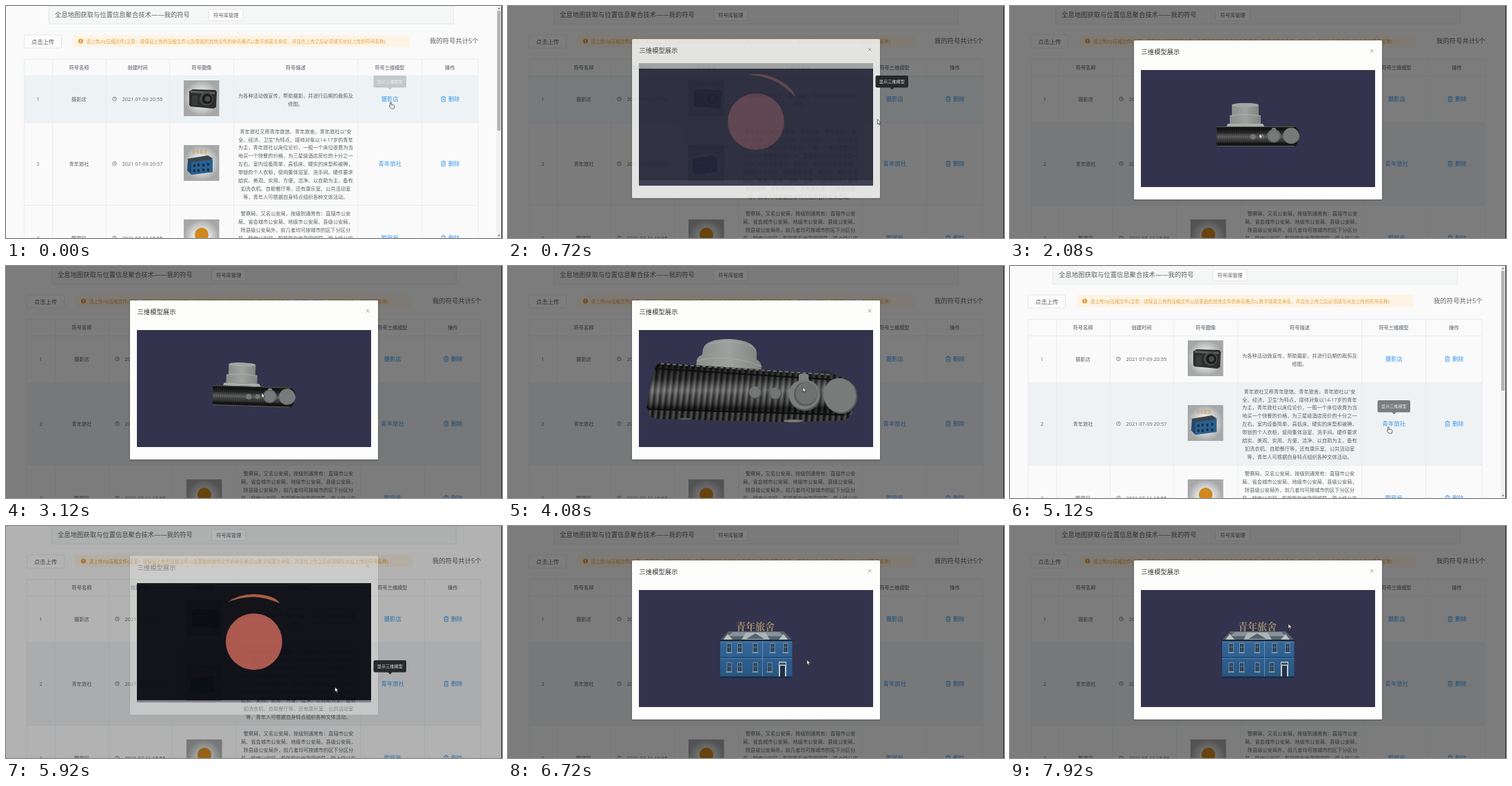
Recreate the animation shown at these times as an HTML page. Size 720 px wide and 337 px high, loop 8000 ms.

```html
<!DOCTYPE html>
<html lang="zh">
<head>
<meta charset="utf-8">
<title>我的符号</title>
<style>
html, body { margin: 0; width: 100%; height: 100%; overflow: hidden; background: #f9fafa; }
svg { display: block; width: 100%; height: 100%; }
text { font-family: "Open Sans", "Noto Sans CJK SC", "Noto Sans CJK", sans-serif; }
.sign { font-family: "Noto Serif CJK SC", "Noto Sans CJK SC", serif; font-weight: 600; }
</style>
</head>
<body>
<svg id="stage" viewBox="0 0 720 337" preserveAspectRatio="none"></svg>
<script>
const GREY = '#606266', BLUE = '#3f98ee', LINE = '#e9ecf0';

// ---- drawing helpers ----
const rect = (x, y, w, h, fill, more = '') =>
  `<rect x="${x}" y="${y}" width="${w}" height="${h}" fill="${fill}" ${more}/>`;
const circle = (x, y, r, fill, more = '') => `<circle cx="${x}" cy="${y}" r="${r}" fill="${fill}" ${more}/>`;
const oval = (x, y, rx, ry, fill, more = '') =>
  `<ellipse cx="${x}" cy="${y}" rx="${rx}" ry="${ry}" fill="${fill}" ${more}/>`;
const path = (d, fill, more = '') => `<path d="${d}" fill="${fill}" ${more}/>`;
const stroke = (d, color, w = 1) => path(d, 'none', `stroke="${color}" stroke-width="${w}"`);
const text = (x, y, size, fill, s, anchor = 'middle', more = '') =>
  `<text x="${x}" y="${y + size * 0.37}" font-size="${size}" fill="${fill}" text-anchor="${anchor}" ${more}>${s}</text>`;
const group = (id, body, more = '') => `<g id="${id}" ${more}>${body}</g>`;
const gradient = (id, stops, dir = 'x2="0" y2="1"') => `<linearGradient id="${id}" ${dir}>` +
  stops.map(([o, c, a = 1]) => `<stop offset="${o}" stop-color="${c}" stop-opacity="${a}"/>`).join('') + '</linearGradient>';
const ridges = (id, w, dark, light) => gradient(id + 'Tone', [[0, dark], [.6, light], [1, dark]], '') +
  `<pattern id="${id}" width="${w}" height="400" patternUnits="userSpaceOnUse" patternTransform="skewX(-6)">` +
  rect(0, 0, w, 400, `url(#${id}Tone)`) + '</pattern>';

const defs = `<defs>
  <radialGradient id="photo"><stop offset=".3" stop-color="#f2f2f2"/><stop offset="1" stop-color="#a6a7a7"/></radialGradient>
  ${ridges('fine', 3, '#191a1a', '#4b4d4c')}${ridges('coarse', 8.6, '#0d0e0e', '#767876')}
  ${gradient('sheen', [[0, '#000', .75], [.3, '#111', .45], [.52, '#aaa', .36], [.66, '#555', .25], [.85, '#000', .65], [1, '#000', .5]])}
  ${gradient('metal', [[0, '#8b8e8b'], [.5, '#9ea19e'], [1, '#828582']], '')}
  ${gradient('wall', [[0, '#35679a'], [.5, '#2d5e8f'], [1, '#2a557f']])}
  <clipPath id="view"><rect x="190" y="93" width="340" height="170"/></clipPath>
  <filter id="shade" x="-10%" y="-10%" width="120%" height="120%"><feDropShadow dx="0" dy="1" stdDeviation="1.5" flood-opacity=".25"/></filter>
</defs>`;

// ---- page ----
const cols = [26.5, 67.5, 145.5, 237.5, 330.5, 510.5, 603.5, 685.5];
const tops = [77.5, 101.5, 169.5, 289.5];
const rows = [
  { y: 135, name: '摄影店', time: '2021 07-09 20:55', first: 130, lines: [
    '为各种活动做宣传，帮助摄影，并进行后期的裁剪及', '修图。'] },
  { y: 229, name: '青年旅社', time: '2021 07-09 20:57', first: 182, lines: [
    '青年旅社又称青年旅馆、青年旅舍。青年旅社以“安',
    '全、经济、卫生”为特点，接待对象以14-17岁的青年',
    '为主，青年旅社以床位论价，一般一个床位收费为当',
    '地买一个快餐的价格，为三星级酒店房价的十分之一',
    '左右。室内设备简单，高低床、硬实的床垫和被褥，',
    '带锁的个人衣柜，使用集体浴室、洗手间。硬件要求',
    '结实、美观、实用、方便、洁净、以自助为主，备有',
    '如洗衣机、自助餐厅等，还有康乐室、公共活动室',
    '等，青年人可根据自身特点组织各种文体活动。'] },
  { y: 337, name: '警察局', time: '2021 07-11 15:55', first: 301.5, lines: [
    '警察局，又名公安局，按级别通常有：直辖市公安',
    '局、省会城市公安局、地级市公安局、县级公安局，',
    '除县级公安局外，前几者均可按城市的区下分区分',
    '局，特定公安局、股所所在地政府领导，受上级公安'] }
];

const thumbs = [
  path('M266 124l5-3 33 1 2 3-1 22-4 2-33-3-2-2z', '#2c2d2d') + path('M268 123l35 2v3l-35-2z', '#5d5f5f') +
    circle(291, 135, 10, '#484a4a') + circle(292, 135, 7.5, '#1b1c1c') + circle(292.5, 135, 4, '#4a4d50') +
    rect(270, 130, 8, 14, '#3b3c3c'),
  path('M264 223l31-3 5 4v17l-31 4-6-6z', '#1f4a72') + path('M269 226l31-3v18l-31 4z', '#2b618f') +
    path('M263 222l30-5 8 5-32 5z', '#3a4650') +
    path('M272 230h3v4h-3zm6-1h3v4h-3zm7 0h3v4h-3zm7-1h3v4h-3zm-20 9h3v4h-3zm6 0h3v4h-3zm7-1h3v4h-3zm7 0h3v4h-3z', '#16304a') +
    text(281, 211.5, 5.5, '#c49a4a', '青年旅舍', 'middle', 'class="sign"'),
  circle(284, 332, 10, '#d0881f')
];

const clock = y => circle(157.5, y, 2.8, 'none', `stroke="${GREY}" stroke-width=".7"`) + stroke(`M157.5 ${y - 1.8}v1.9h1.4`, GREY, .6);
const bin = y => stroke(`M631.5 ${y - 2.4}h7M633.8 ${y - 2.6}v-1.2h2.4v1.2M632.4 ${y - 2.2}v6h5.2v-6M634.2 ${y - .6}v3M635.8 ${y - .6}v3`, BLUE, .75);

function row({ y, name, time, first, lines }, i) {
  return text(46.5, y, 7.3, GREY, i + 1) + text(106, y, 7.25, GREY, name) +
    clock(y) + text(168.5, y, 7.4, GREY, time, 'start') +
    rect(258, y - 27, 51.5, 52, 'url(#photo)') + thumbs[i] +
    lines.map((s, k) => text(420.5, first + k * 11.9, 7.25, GREY, s)).join('') +
    text(557.3, y, 8.35, BLUE, name) + bin(y) + text(642, y, 8.35, BLUE, '删除', 'start');
}

const heads = [[106, '符号名称'], [191, '创建时间'], [284, '符号图像'], [420.5, '符号描述'], [557, '符号三维模型'], [644.5, '操作']];
const page =
  rect(62.5, -4, 587, 30, '#f5f6f6', 'stroke="#e6e7e8"') +
  text(71, 13, 9.33, GREY, '全息地图获取与位置信息聚合技术——我的符号', 'start') +
  rect(294.5, 5, 49.5, 16.5, '#fdfdfd', 'rx="2" stroke="#dcdfe3" stroke-width=".8"') + text(319.5, 13.2, 7.25, GREY, '符号库管理') +
  rect(26.5, 42, 54, 19, '#fcfcfc', 'rx="2" stroke="#e0e3e6" stroke-width=".8"') + text(53.5, 51.5, 8.35, GREY, '点击上传') +
  rect(96.5, 42, 489.5, 18, '#fdf4e6', 'rx="3"') +
  circle(108.5, 51, 3.6, '#e6a03a') + rect(108.1, 48.8, .9, 2.7, '#fff') + rect(108.1, 52.2, .9, .9, '#fff') +
  text(116.5, 51.3, 6.7, '#e6a03a', '请上传zip压缩文件(注意：请保证上传的压缩文件以及里面的其他文件的命名格式以数字或英文命名，并且在上传之后必须填写对应上传的符号名称)', 'start') +
  text(686, 51, 9.4, GREY, '我的符号共计5个', 'end') +
  rect(26.5, 101.5, 659, 68, '#edf3f5', 'id="hover1"') + rect(26.5, 169.5, 659, 120, '#eff2f3', 'id="hover2"') +
  stroke(cols.map(x => `M${x} 77.5V337`).join('') + tops.map(y => `M26.5 ${y}H685.5`).join(''), LINE, .9) +
  heads.map(([x, s]) => text(x, 89.5, 7.2, '#85888e', s, 'middle', 'font-weight="600"')).join('') +
  rows.map(row).join('');

const bar = rect(712, 0, 7, 337, '#f1f1f1') + rect(713, 7, 5, 174, '#b4b5b5') +
  path('M713.8 4.5h3.6l-1.8-2.4z', '#777') + path('M713.8 332.5h3.6l-1.8 2.4z', '#777');

// ---- models ----
const small =
  path('M322 144q0-3 19.500-3t19.500 3v15h-39z', 'url(#metal)') + oval(341.5, 144, 19.5, 3, '#a4a6a3') +
  path('M319 159q22-4 45 0v12h-45z', 'url(#metal)') + stroke('M319 159.500q22-4 45 0', '#b4b6b3', .8) +
  path('M316 171h51l3 5h-56z', '#abaeaa') +
  path('M395 176q3-5 9-5t10 5z', '#333535') +
  ['url(#fine)', 'url(#sheen)'].map(f => path('M300 175h112q9 3 9 12t-7 17h-114z', f)).join('') +
  stroke('M300 175.500h113M300 203.500h113', '#6d706e', .8) + stroke('M300 179.500h112', '#111', 1) +
  circle(352.5, 190, 4, '#747774') + circle(365, 189.5, 3.5, '#747774') +
  rect(380, 177, 6, 5, '#858885', 'rx="1.5"') + circle(383, 188.5, 9.8, '#6c6f6d') + circle(383, 188.5, 7.5, '#777a78') +
  circle(408, 188.5, 11.8, '#777a78');

const back = rect(300, 0, 121, 70, '#202222', 'rx="4"') + rect(308, 10, 74, 50, '#34383c') +
  circle(402, 37, 9, '#4c4f4e') + circle(402, 37, 4, '#2b2d2d');

const bodyTop = 'M211 154Q214 141 224 141L470 157Q505 164 507 187Q506 214 486 218L206 209L201 206Z';
const bodyRim = 'M203 206L486 214Q498 211 502 207Q499 221 486 224L410 227L215 222Q203 219 203 206Z';
const large =
  path('M283 121Q286 106 322 106Q358 108 361 125L361 148L280 140Z', 'url(#metal)') +
  stroke('M284 119Q290 110 322 110Q356 112 360 124', '#a9aba8', .8) +
  path('M274 137Q276 124 318 126Q366 130 368 145L367 158L273 149Z', 'url(#metal)') + stroke('M274 138Q318 126 368 146', '#a9aca8', .8) +
  path('M450 158l6-6q10-1 22 9z', '#292b2b') +
  path(bodyRim, 'url(#coarse)') + path(bodyRim, '#000', 'opacity=".3"') +
  path(bodyTop, 'url(#coarse)') + path(bodyTop, 'url(#sheen)') +
  stroke('M213 149L470 165', '#0d0e0e', 2) + path('M222 142L470 158', 'none', 'stroke="#6d706e" stroke-width="2" stroke-dasharray="5 3.6"') +
  stroke('M203 208L486 216', '#0d0e0e', 2) +
  oval(257, 222, 8, 1.6, '#565957') + oval(414, 225, 14, 2, '#767a72') +
  circle(359, 184, 9.3, '#4d504e') + circle(358.5, 183.3, 8.3, '#737674') +
  circle(388.5, 185.5, 9, '#4d504e') + circle(388, 184.8, 8, '#737674') +
  path('M422 158q7-4 14 0l1 14h-15z', '#7f827f') +
  oval(431, 188, 23, 22.5, '#555856') + oval(430, 186.5, 22.5, 21.5, '#7a7d7a') +
  oval(432, 186, 17, 17.5, '#575a58') + oval(433, 185, 15.5, 16, '#6e716f') +
  oval(483, 189, 24, 26, '#555856', 'transform="rotate(-18 483 189)"') + oval(481.5, 188, 23.5, 25, '#787b79', 'transform="rotate(-18 481 188)"');

const pane = (x, y) => rect(x - 3.5, y, 7, 14, '#7f97aa') + rect(x - 2.5, y + 1, 5, 12, '#1c3046') +
  stroke(`M${x} ${y + 1}v12M${x - 2.5} ${y + 6}h5`, '#8fa3b2', .6) + rect(x - 4.5, y + 13.5, 9, 1.2, '#93a6b4');
const house =
  path('M320 153h80l13 13h-105z', '#59646c') + path('M326 154h68l6 6h-80z', '#87919a') +
  path('M339 165l6-10h29l6 10z', '#adb4b6') + path('M346 164l13-8 13 8z', '#57636e') +
  path('M313 165l6-8 7 8zM393 165l7-8 6 8z', '#bcc1c0') +
  rect(308, 165, 104.5, 56, 'url(#wall)') + rect(307, 165, 106.5, 2.5, '#1b2d3f') + rect(308, 168, 104.5, 1, '#5a86ae') +
  rect(308, 190.5, 104.5, 1.2, '#1d4166') + rect(308, 192, 104.5, 1, '#4f7fab') +
  [321, 336.5, 359, 384, 403].map(x => pane(x, 170)).join('') +
  [321, 336.5, 359, 380].map(x => pane(x, 198)).join('') +
  stroke('M369.500 167v53', '#6f99bd', .8) +
  rect(393, 197, 11, 23, '#c7cdce') + rect(395, 203, 7, 17, '#203247') + rect(394, 198.5, 9, 3, '#394d5e') +
  rect(308, 218.5, 104.5, 2.5, '#182d42') +
  text(359, 145.5, 14, '#a8956f', '青年旅舍', 'middle', 'class="sign"');

// ---- dialog, loader, tooltip, pointer ----
const dialog = rect(180, 50, 360, 231, '#fdfefb', 'rx="1.5" filter="url(#shade)"') +
  text(190.5, 67, 9.33, '#303133', '三维模型展示', 'start') +
  stroke('M522.800 62.800l4.600 4.600m0-4.600l-4.600 4.600', '#85888d', .8) +
  rect(190, 93, 340, 170, '#33334d') +
  `<g clip-path="url(#view)">${group('camera', group('back', back) + group('small', small))}${group('large', large)}${group('house', house)}</g>`;

const loader = rect(190, 83, 340, 170, '#0a0c12') + circle(360, 168, 41, '#b0584c') +
  group('spin', path('M321 111Q338 99 360 99Q390 100 397 112Q376 103 358 103Q338 104 321 111Z', '#ad5a40'));

const tip = rect(533.5, 101, 47.5, 17.5, '#26282a', 'rx="2"') + path('M554 118h7l-3.500 3.500z', '#26282a') +
  text(557.3, 109.8, 6.2, '#e6e6e6', '显示三维模型');

const ink = 'stroke="#222" stroke-width=".7" stroke-linejoin="round"';
const arrow = path('M0 0v7l1.600-1.400 1.100 2.500 1.200-.5-1.100-2.500h2.200z', '#fff', ink);
const hand = path('M-.8 1q.8-1.200 1.600 0v3.200l3.500.8q1.200.4 1 1.700l-.6 3.300h-4.200l-2.700-3.600q-.2-1.200 1.400-.4z', '#fff', ink);

document.getElementById('stage').innerHTML = defs + rect(0, 0, 720, 337, '#f9faf9') +
  group('page', page) + group('bar', bar) + rect(0, 0, 720, 337, '#000', 'id="mask"') +
  group('dialog', dialog) + group('loader', loader) + group('tip', tip) +
  group('arrow', arrow) + group('hand', hand) + rect(719, 0, 1, 337, '#2a2a2a');

// ---- timeline: rows of [ms, value...] ----
const LOOP = 8000, OPEN = [500, 5820], CLOSE = 4700;
const tracks = {
  pointer: [[0, 558.5, 139], [400, 557, 138], [520, 556, 141], [720, 536.5, 164.5], [960, 500, 183], [1200, 430, 188],
    [1440, 372, 150], [1920, 362, 176], [2080, 362, 185.5], [2400, 357, 187], [2960, 368, 185], [3600, 380, 183],
    [3840, 400, 180], [4080, 428, 176], [4360, 429, 176], [4560, 500, 90], [4640, 525, 65], [4760, 525, 65],
    [5040, 549, 224], [5120, 549.5, 233], [5780, 549.5, 233], [5920, 477.5, 234], [6400, 450, 220], [7000, 420, 172],
    [7520, 406, 147], [7920, 404, 142]],
  tip: [[0, .2], [160, 1], [760, 1], [1000, 0], [5050, 0], [5172, 1], [5960, 1], [6200, 0]],
  hover1: [[0, 1], [640, 1], [860, 0]],
  hover2: [[600, 0], [860, 1]],
  pitch: [[1000, 25], [1440, 30], [2000, 90]],
  sway: [[2080, 0], [2480, -3], [2960, 4], [3400, -2], [3840, 3]],
  zoom: [[3840, .41], [4080, 1], [4240, 1.04]],
  // opacity and rise of the dialog
  show: [[0, 0, -20], [100, .34, -6.8], [220, .8, -2], [320, 1, 0]],
  mask: [[0, 0], [100, .58], [200, 1]],
  load: [[0, .96], [100, .94], [220, .3], [440, .08], [700, 0]]
};

function at(name, t) {
  const k = tracks[name], n = k.findIndex(r => r[0] > t);
  if (n < 0) return k[k.length - 1].slice(1);
  if (n === 0) return k[0].slice(1);
  const a = k[n - 1], b = k[n], u = (t - a[0]) / (b[0] - a[0]);
  return a.slice(1).map((v, i) => v + (b[i + 1] - v) * u);
}
const num = (name, t) => at(name, t)[0];

const parts = {};
document.querySelectorAll('#stage [id]').forEach(e => parts[e.id] = e);
const move = (id, s) => parts[id].setAttribute('transform', s);
const fade = (id, v) => {
  parts[id].setAttribute('opacity', v);
  parts[id].style.display = v > 0 ? '' : 'none';
};

function draw(t) {
  const second = t >= OPEN[1], since = t - (second ? OPEN[1] : OPEN[0]);
  const closing = !second && t > CLOSE;
  const [shown, rise] = at('show', closing ? CLOSE + 320 - t : since);
  const modal = since >= -20 && (second || t < CLOSE + 300);

  move('page', `translate(${modal ? 4 : 0} 0)`);
  fade('bar', modal ? 0 : 1);
  fade('mask', .5 * (closing ? 1 - num('mask', t - CLOSE) : num('mask', since)));
  fade('dialog', shown);
  move('dialog', `translate(0 ${rise})`);
  fade('loader', since < 0 || closing ? 0 : num('load', since));
  move('spin', `rotate(${.48 * (t - 5920)} 360 168)`);
  fade('hover1', num('hover1', t));
  fade('hover2', num('hover2', t));
  fade('tip', num('tip', t));
  move('tip', `translate(0 ${t > 3000 ? 94 : 0})`);

  const p = num('pitch', t) * Math.PI / 180, c = Math.cos(p), s = Math.sin(p), edge = 204 - 35 * c;
  fade('camera', t > 1000 && t < 3880 ? 1 : 0);
  move('camera', `rotate(${num('sway', t)} 360 188)`);
  move('small', `translate(0 ${edge}) scale(1 ${s}) translate(0 -204)`);
  move('back', `translate(0 ${edge - 1}) scale(1 ${c})`);
  fade('large', t >= 3880 && !second ? 1 : 0);
  move('large', `translate(357 180) scale(${num('zoom', t)}) translate(-357 -180)`);
  fade('house', t > 6400 ? 1 : 0);

  const pointing = t < 480 || (t > 5060 && t < OPEN[1]), where = `translate(${at('pointer', t)})`;
  fade('hand', pointing ? 1 : 0);
  fade('arrow', pointing ? 0 : 1);
  move('hand', where);
  move('arrow', where);
}

const start = performance.now();
function tick() {
  draw((performance.now() - start) % LOOP);
  requestAnimationFrame(tick);
}
tick();
</script>
</body>
</html>
```
